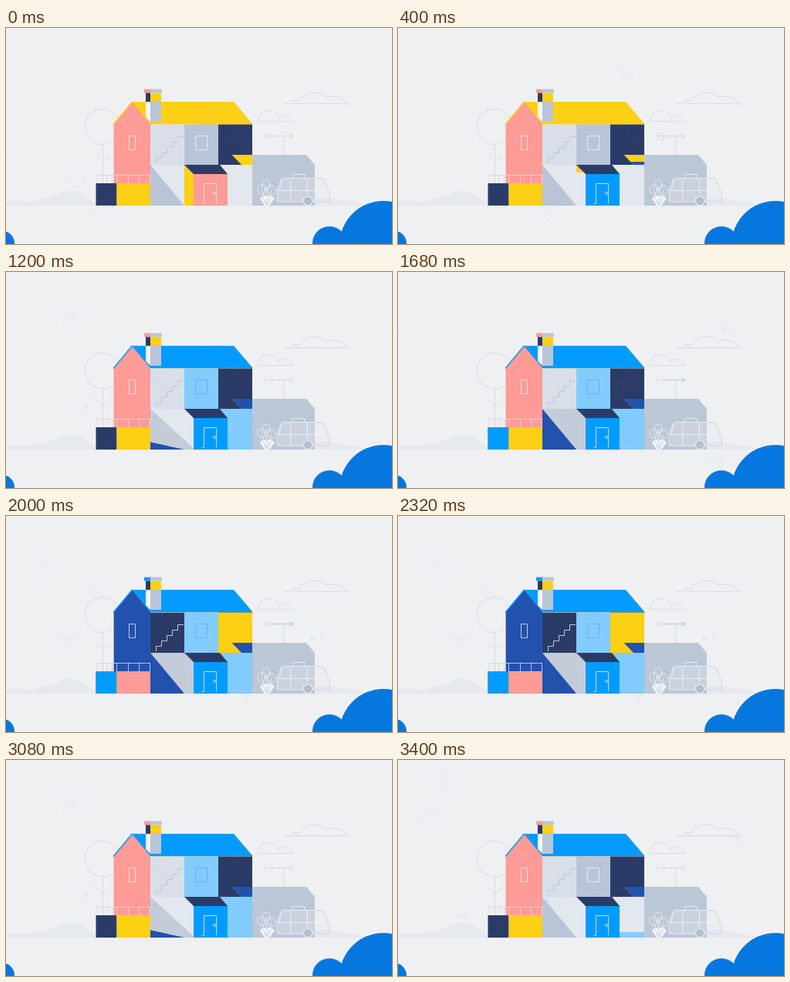
Recreate the animation shown at these times as an HTML page with a canvas. Size 500x281 px, loop 3440 ms.

```html
<!DOCTYPE html>
<html lang="en">
<head>
<meta charset="utf-8">
<title>House of blocks</title>
<style>
  html, body { margin: 0; width: 100%; height: 100%; overflow: hidden; background: #eff0f2; }
  canvas { display: block; width: 500px; height: 281px; }
</style>
</head>
<body>
<canvas id="stage"></canvas>
<script>
const W = 500, H = 281, LOOP = 3440, STEP = 40, MIRROR = 4280;
const canvas = document.getElementById('stage');
const ratio = window.devicePixelRatio || 1;
canvas.width = W * ratio;
canvas.height = H * ratio;
const c = canvas.getContext('2d');
c.scale(ratio, ratio);

const C = {
  paper: '#eff0f2', pale: '#e3e7ee', mist: '#d9dfe8', grey: '#b9c5d7', stone: '#c4ccd9',
  navy: '#2b3b68', deep: '#2252ad', blue: '#039cfe', sky: '#82ccfd',
  yellow: '#fcd015', pink: '#fd9b97', pool: '#0577de', line: '#d1d5dd', white: '#f4f5f8'
};

function random(seed) {
  let s = seed * 7919 + 17;
  return () => {
    s = (s + 0x6D2B79F5) | 0;
    let r = Math.imul(s ^ (s >>> 15), 1 | s);
    r = (r + Math.imul(r ^ (r >>> 7), 61 | r)) ^ r;
    return ((r ^ (r >>> 14)) >>> 0) / 4294967296;
  };
}

// Eased progress of time t between a and b
function ease(t, a, b) {
  const k = Math.min(1, Math.max(0, (t - a) / (b - a)));
  return k * k * (3 - 2 * k);
}

function trace(points) {
  c.beginPath();
  for (let i = 0; i < points.length; i += 2) c.lineTo(points[i], points[i + 1]);
  c.closePath();
}

function poly(color, ...points) {
  c.fillStyle = color;
  trace(points);
  c.fill();
}

function box(color, x, y, w, h) {
  c.fillStyle = color;
  c.fillRect(x, y, w, h);
}

function disc(color, x, y, r) {
  c.fillStyle = color;
  c.beginPath();
  c.arc(x, y, r, 0, Math.PI * 2);
  c.fill();
}

function stroke(d, color, width = 0.75) {
  c.strokeStyle = color;
  c.lineWidth = width;
  c.stroke(new Path2D(d));
}

function fill(d, color) {
  c.fillStyle = color;
  c.fill(new Path2D(d));
}

function clipped(points, paint) {
  c.save();
  trace(points);
  c.clip();
  paint();
  c.restore();
}

// Fills a block and slides a second colour over it, upward or to the right
function wipe(points, from, to, k, sideways) {
  poly(from, ...points);
  if (k <= 0) return;
  const xs = points.filter((_, i) => i % 2 === 0), ys = points.filter((_, i) => i % 2);
  const x = Math.min(...xs), y = Math.min(...ys);
  const w = Math.max(...xs) - x, h = Math.max(...ys) - y;
  clipped(points, () => {
    if (sideways) box(to, x, y, w * k, h);
    else box(to, x, y + h * (1 - k), w, h * k);
  });
}

const rect = (x, y, w, h) => [x, y, x + w, y, x + w, y + h, x, y + h];

function scenery(t) {
  box(C.paper, 0, 0, W, H);
  fill('M0 231V226Q14 223 26 226Q54 223 68 216Q84 208 98 215Q108 223 120 231Z', '#e6e9ee');
  fill('M400 231V223Q415 219 430 223Q450 226 472 231Z', '#e6e9ee');
  box('#eceef1', 0, 231, W, 1);

  stroke('M148 128.5A23 23 0 1 1 102 128.5A23 23 0 1 1 148 128.5M125.5 151V202M117 166L125.5 174L134 166', C.line);
  stroke('M361 98.5H444M369 97Q373 93 380 95C382 84 408 80 415 90Q428 86 437 93L441 97', C.line);
  stroke('M323 121.5H374M327 120C327 104 350 104 354 117Q363 108 371 120', C.line);
  stroke('M359.5 141V165', C.line);
  stroke('M334 140.5H371M335 136L339 140.5L335 145M342 136L346 140.5L342 145M367 137L372 140.5L367 144', C.line);
  c.globalAlpha = 0.55 * ease(t, 1480, 1800);
  stroke('M346 140.5H371M367 137L372 140.5L367 144', '#6dafe9');
  c.globalAlpha = 1;
  stroke('M117 191.5H139M118.5 191V202M125.5 191V202M131.5 191V202M137.5 191V202', C.line);
}

function garage() {
  poly('#bcc7d6', 319, 165, 389, 165, 400, 178, 400, 231, 319, 231);
  stroke('M371.5 196V190.5H386.5V196', C.white);

  const van = 'M351.5 226V209L357 196.5Q358 195.5 361 195.5H408Q411 195.5 413 199L417 211L419.5 215V226Z';
  fill(van, 'rgba(225,230,238,.35)');
  stroke(van, C.white);
  stroke('M400 195.5H408Q411 195.5 413 199L417 211L419.5 215V226H400', '#c3cbd7');
  stroke('M352 211.5H417M368.5 196V226M390.5 196V218M357 197L354 211', C.white);
  disc(C.white, 391, 225, 6.3);
  disc('#b3c0d1', 391, 225, 5.4);

  for (const [x, y] of [[331, 210], [337, 204], [344, 211]]) {
    stroke(`M${x + 5} ${y}A5 6 0 1 1 ${x - 5} ${y}A5 6 0 1 1 ${x + 5} ${y}M${x} ${y}L338 230`, C.white);
  }
  fill('M329 222Q334 216 338 219Q343 216 348 222L341 231H335Z', C.white);
  stroke('M333 220L337 230M338 219V230M343 220L339 230', '#b3c1d3');
}

// Two edges turn in sequence: grey opens upward, dark blue follows
function stairwell(t) {
  const well = [187, 178, 231, 178, 243, 190, 243, 231, 187, 231];
  const lift = ease(t, 1060, 1500), follow = ease(t, 1080, 1520);
  clipped(well, () => {
    box(C.pale, 187, 178, 56, 53);
    const slope = 53 / 44 * (1 - lift);
    poly(lift ? C.stone : C.grey, 187, 178, 243, 178 + 56 * slope, 243, 250, 187, 250);
    poly(C.deep, 187, 231 - 53 * follow, 231, 231, 187, 231);
  });
  const gone = ease(t, 240, 460);
  clipped([231, 178, 243, 190, 243, 231, 231, 231], () => {
    box(C.yellow, 231, 178, 12, 53 * (1 - gone));
  });
}

function house(t) {
  const late = ease(t, 1760, 1960), tiled = ease(t, 760, 875);

  // Upper floor
  wipe([162, 96, 295, 96, 320, 125.5, 187, 125.5], C.yellow, C.blue, tiled, true);
  wipe(rect(187, 125.5, 44, 52.5), C.mist, C.navy, late);
  wipe(rect(231, 125.5, 44, 52.5), C.grey, C.sky, ease(t, 940, 1150));
  wipe(rect(275, 125.5, 44, 52.5), C.navy, C.yellow, ease(t, 1740, 1940));
  wipe([292.5, 165, 319, 165, 319, 178, 305, 178], C.yellow, C.deep, ease(t, 320, 540));

  // Ground floor
  stairwell(t);
  wipe([277, 178, 319, 178, 319, 231, 287, 231, 287, 190], C.pale, C.sky, ease(t, 820, 1080));
  wipe(rect(243, 189, 44, 42), C.pink, C.blue, ease(t, 120, 360));
  poly(C.navy, 231, 178, 277, 178, 287, 190, 243, 190);

  // Gable and terrace
  wipe([163.5, 96.5, 187, 125, 187, 202, 139.5, 202, 139.5, 125], C.pink, C.deep, ease(t, 1730, 1960));
  stroke('M163.5 96L139 125.5', tiled > 0 ? C.blue : C.yellow, 1.5);
  wipe(rect(116.5, 202, 27, 29), C.navy, C.blue, ease(t, 1400, 1640));
  wipe(rect(143.5, 202, 43.5, 29), C.yellow, C.pink, ease(t, 1780, 1980));

  // Chimney
  wipe(rect(179, 79.5, 8, 5), C.pink, C.blue, ease(t, 1760, 1920));
  box(C.grey, 187, 79.5, 15, 5);
  box(C.navy, 181, 84.5, 6, 11.5);
  box(C.yellow, 187, 84.5, 14, 11.5);
  poly(C.white, 181, 96, 187, 96, 187, 122, 181, 116);
  box(C.grey, 187, 96, 14, 26);

  // Line work
  stroke('M159.5 140.5H167.5V158.5H159.5Z', C.white);
  const glass = ease(t, 940, 1150);
  stroke('M245.5 140.5H260.5V158.5H245.5Z', glass > 0.5 ? '#68a9dc' : C.white);
  stroke('M194.5 176.5V169.5H201.5V162.5H208.5V155.5H215.5V148.5H222.5V141.5H230', late > 0.5 ? C.white : '#b7bfcc');
  stroke('M139 191.5H187M143.5 191V202M158.5 191V202M172.5 191V202M186.5 191V202', '#f6dfe1');
  stroke('M253.5 228.5H256.5V202.5H272.5V228', C.white);
  stroke('M271.5 215A1.5 1.5 0 1 1 268.5 215A1.5 1.5 0 1 1 271.5 215', C.white);
}

function pools() {
  disc(C.pool, 489, 282, 57);
  disc(C.pool, 419, 280, 22);
  disc(C.pool, -5, 280, 16);
}

// Printed paper texture, renewed every few steps
function texture(t) {
  const rnd = random(1 + Math.floor(t / 120));
  for (let i = 0; i < 700; i++) {
    c.fillStyle = rnd() < 0.5 ? 'rgba(255,255,255,.14)' : 'rgba(120,140,170,.05)';
    c.fillRect(rnd() * W, rnd() * H, 1, 1);
  }
  for (let n = 0; n < 5; n++) {
    const x = 40 + rnd() * 420, y = 25 + rnd() * 225;
    c.fillStyle = 'rgba(130,195,245,.16)';
    for (let i = 0; i < 60; i++) {
      const a = rnd() * Math.PI * 2, r = rnd() * 24;
      c.fillRect(x + Math.cos(a) * r, y + Math.sin(a) * r * 0.7, 1, 1);
    }
  }
}

function draw() {
  const now = Math.floor((performance.now() % LOOP) / STEP) * STEP;
  // The second part plays the first backwards, then cuts to the start
  const t = Math.min(now, MIRROR - now);
  scenery(t);
  garage();
  house(t);
  texture(t);
  pools();
  requestAnimationFrame(draw);
}
draw();
</script>
</body>
</html>
```
